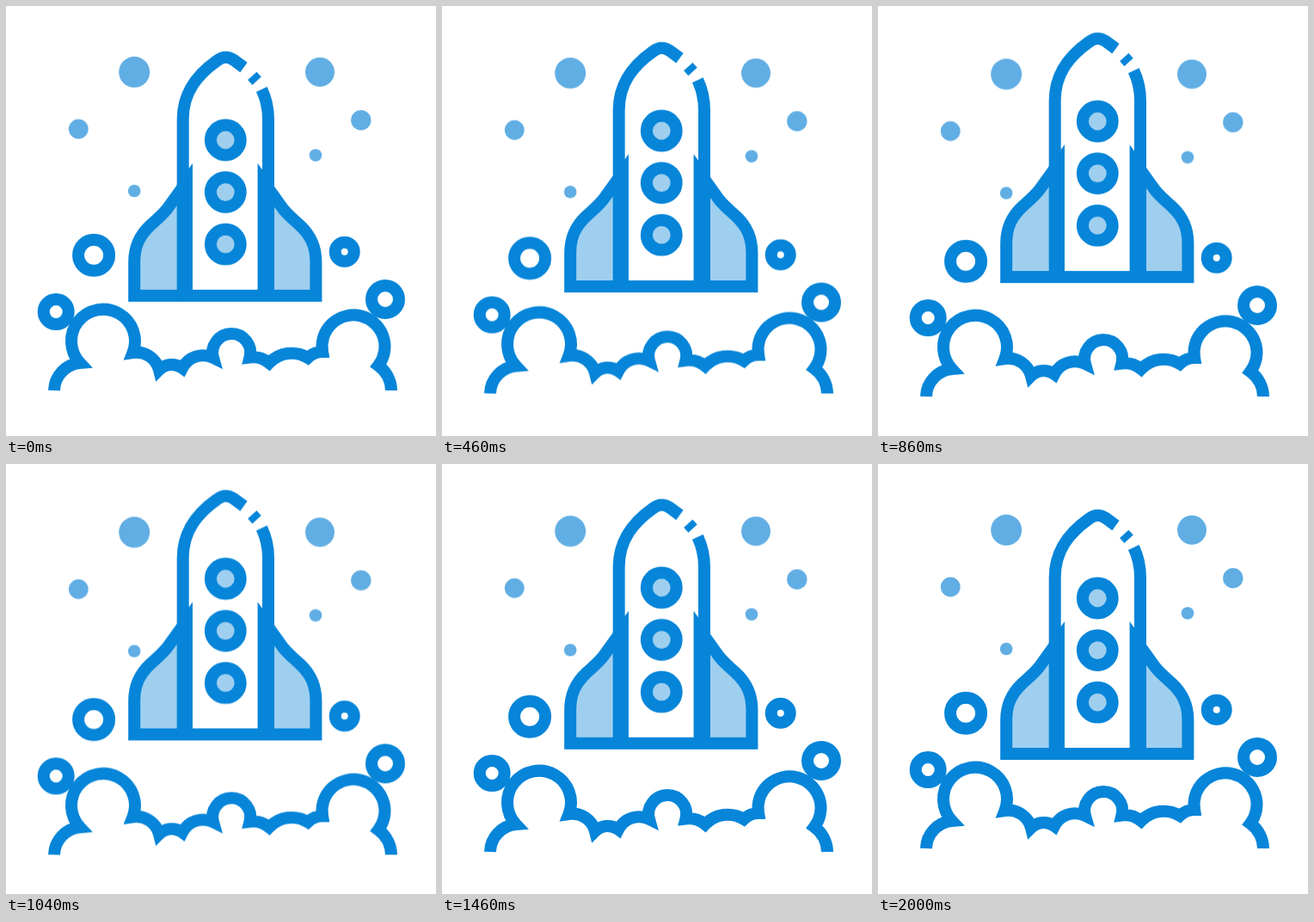
Write an HTML page that moves like this. It is 500 px wide and 500 px high and loops after 2020 ms.

```html
<!DOCTYPE html>
<html lang="en">
<head>
<meta charset="utf-8">
<title>Rocket</title>
<style>
  html, body {
    margin: 0;
    width: 100%;
    height: 100%;
    overflow: hidden;
    background: #fff;
  }
  svg {
    display: block;
    width: 100%;
    height: 100%;
  }
  .line {
    fill: none;
    stroke: #0685d9;
    stroke-width: 14;
  }
  .tint { fill: #9fcfef; }
  .stars { fill: #61aee4; }

  /* Each layer drifts to its own distance and back, resting briefly at the end. */
  .drift {
    animation: drift 2020ms cubic-bezier(.4, .1, .6, .9) -20ms infinite;
  }
  .rocket { --shift: -23.1px; }
  .smoke { --shift: 7.5px; }
  .stars { --shift: 2.6px; }
  @keyframes drift {
    0%, 99.01%, 100% { transform: translateY(0); }
    49.505% { transform: translateY(var(--shift)); }
  }
</style>
</head>
<body>
<svg viewBox="0 0 500 500">
  <defs>
    <path id="fin" d="M210 204.7 L187 236.5 C180 245 172 251 168 255 C155 267 149.2 280 149.2 298 V337 H210 Z"/>
    <circle id="window" cx="255.3" r="17.4"/>
  </defs>

  <g class="drift stars">
    <circle cx="149.2" cy="76.8" r="18"/>
    <circle cx="365" cy="76.8" r="17"/>
    <circle cx="412.8" cy="132.8" r="11.7"/>
    <circle cx="84.3" cy="143" r="11.4"/>
    <circle cx="360" cy="173.5" r="7.3"/>
    <circle cx="149.2" cy="215" r="7.3"/>
  </g>

  <g class="drift smoke line">
    <circle cx="102.1" cy="289.7" r="18"/>
    <circle cx="393.7" cy="285.7" r="11"/>
    <circle cx="58.2" cy="355.5" r="14.5"/>
    <circle cx="441" cy="341" r="16"/>
    <path d="M56 447 A33 33 0 0 1 86 415
      A37 37 0 1 1 147.5 403
      A27 27 0 0 1 178 423
      A20.7 20.7 0 0 1 205 421
      A27 27 0 0 1 241 409
      A22 22 0 1 1 283.5 408.5
      A30 30 0 0 1 306 415
      A36 36 0 0 1 351 409
      A25 25 0 0 1 368 402
      A36.5 36.5 0 1 1 433 418
      A36.5 36.5 0 0 1 448 447"/>
  </g>

  <g class="drift rocket">
    <g class="line">
      <use href="#fin" class="tint"/>
      <use href="#fin" class="tint" transform="translate(509.6) scale(-1 1)"/>
      <path d="M276.5 71.5 L265 63 C258 58.5 252 58.5 245 64 C223 79.5 205.7 100 205.7 132 V337 H305 V132 C305 118 302.5 108 297.3 97"/>
      <path d="M286.3 81.4 L291.6 87.2"/>
      <use href="#window" y="156" class="tint"/>
      <use href="#window" y="216.6" class="tint"/>
      <use href="#window" y="277.2" class="tint"/>
    </g>
  </g>
</svg>
</body>
</html>
```
